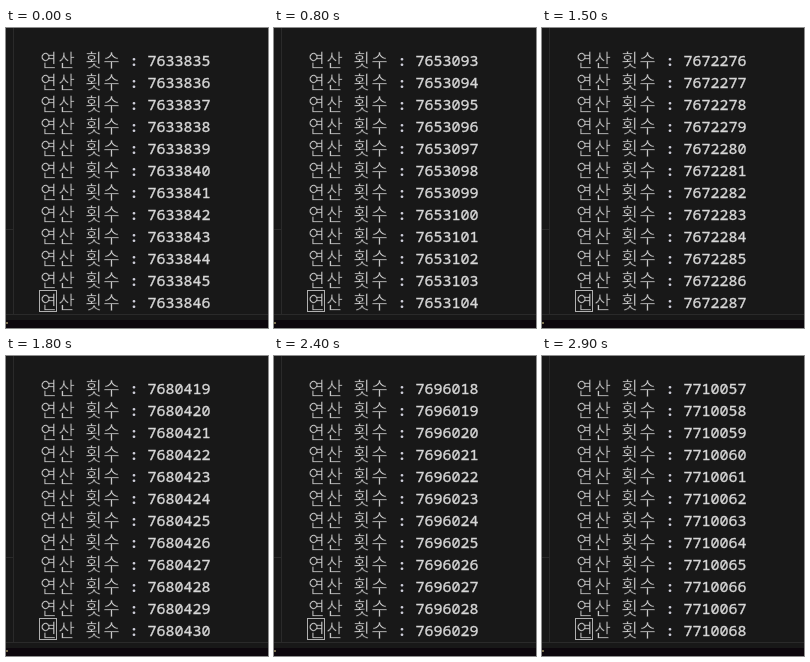
An HTML page with a canvas that plays this animation: 262 by 300 pixels, repeating every 3000 ms.

```html
<!DOCTYPE html>
<html lang="ko">
<head>
<meta charset="utf-8">
<style>
html, body { margin: 0; width: 100%; height: 100%; overflow: hidden; background: #181818; }
canvas { display: block; width: 262px; height: 300px; }
</style>
</head>
<body>
<canvas id="stage" width="262" height="300"></canvas>
<script>
const ctx = document.getElementById('stage').getContext('2d');
const LOOP = 3000, STEP = 100;
const ROWS = 12, ROW_HEIGHT = 22, CELL = 9, LEFT = 33.5, BASELINE = 38;
const BACKGROUND = '#181818', LINE = '#2a2a2a';

// [time in ms, number on the top row]
const counts = [
  [0, 7633835], [300, 7641360], [800, 7653093], [1500, 7672276],
  [2100, 7688561], [2600, 7700990], [2900, 7710057]
];

function countAt(time) {
  const next = Math.max(1, counts.findIndex(([t]) => t >= time));
  const [t0, n0] = counts[next - 1];
  const [t1, n1] = counts[next];
  return Math.round(n0 + (n1 - n0) * (time - t0) / (t1 - t0));
}

function rect(x, y, w, h, color) {
  ctx.fillStyle = color;
  ctx.fillRect(x, y, w, h);
}

// The outline thickens the glyphs, or thins them when it has the background colour.
function drawText(text, x, y, fill, outline, width) {
  ctx.fillStyle = fill;
  ctx.strokeStyle = outline;
  ctx.lineWidth = width;
  ctx.fillText(text, x, y);
  ctx.strokeText(text, x, y);
}

function drawPanel() {
  rect(0, 0, 262, 300, BACKGROUND);
  rect(7, 0, 1, 286, LINE);
  rect(0, 201, 7, 1, LINE);
  rect(0, 286, 262, 1, LINE);
  rect(0, 292, 262, 8, '#0d070d');
  rect(0, 294, 2, 2, '#7a7050');
}

function drawLabel(y) {
  ctx.font = '300 18px "Noto Sans CJK KR", "Noto Sans CJK", sans-serif';
  ctx.textAlign = 'center';
  let x = LEFT;
  for (const char of '연산 횟수') {
    const width = char === ' ' ? CELL : CELL * 2;
    drawText(char, x + width / 2, y + 0.5, '#c8c8c8', BACKGROUND, 0.3);
    x += width;
  }
}

function drawNumber(value, y) {
  ctx.textAlign = 'left';
  ctx.font = 'bold 15px "Noto Sans Mono", monospace';
  ctx.fillStyle = '#d0d0dc';
  ctx.fillText(':', LEFT + CELL * 10, y);
  ctx.font = '15px "Noto Sans Mono", monospace';
  drawText(value, LEFT + CELL * 12, y, '#d8d8d8', '#d8d8d8', 0.35);
}

function draw(now) {
  const time = Math.floor((now % LOOP) / STEP) * STEP;
  const first = countAt(time);
  drawPanel();
  for (let row = 0; row < ROWS; row++) {
    const y = BASELINE + row * ROW_HEIGHT;
    drawLabel(y);
    drawNumber(first + row, y);
  }
  ctx.strokeStyle = '#b0b0b0';
  ctx.lineWidth = 1;
  ctx.strokeRect(33.5, 262.5, 17, 21);
}

let start;
function tick(now) {
  start ??= now;
  draw(now - start);
  requestAnimationFrame(tick);
}
draw(0);
requestAnimationFrame(tick);
</script>
</body>
</html>
```
